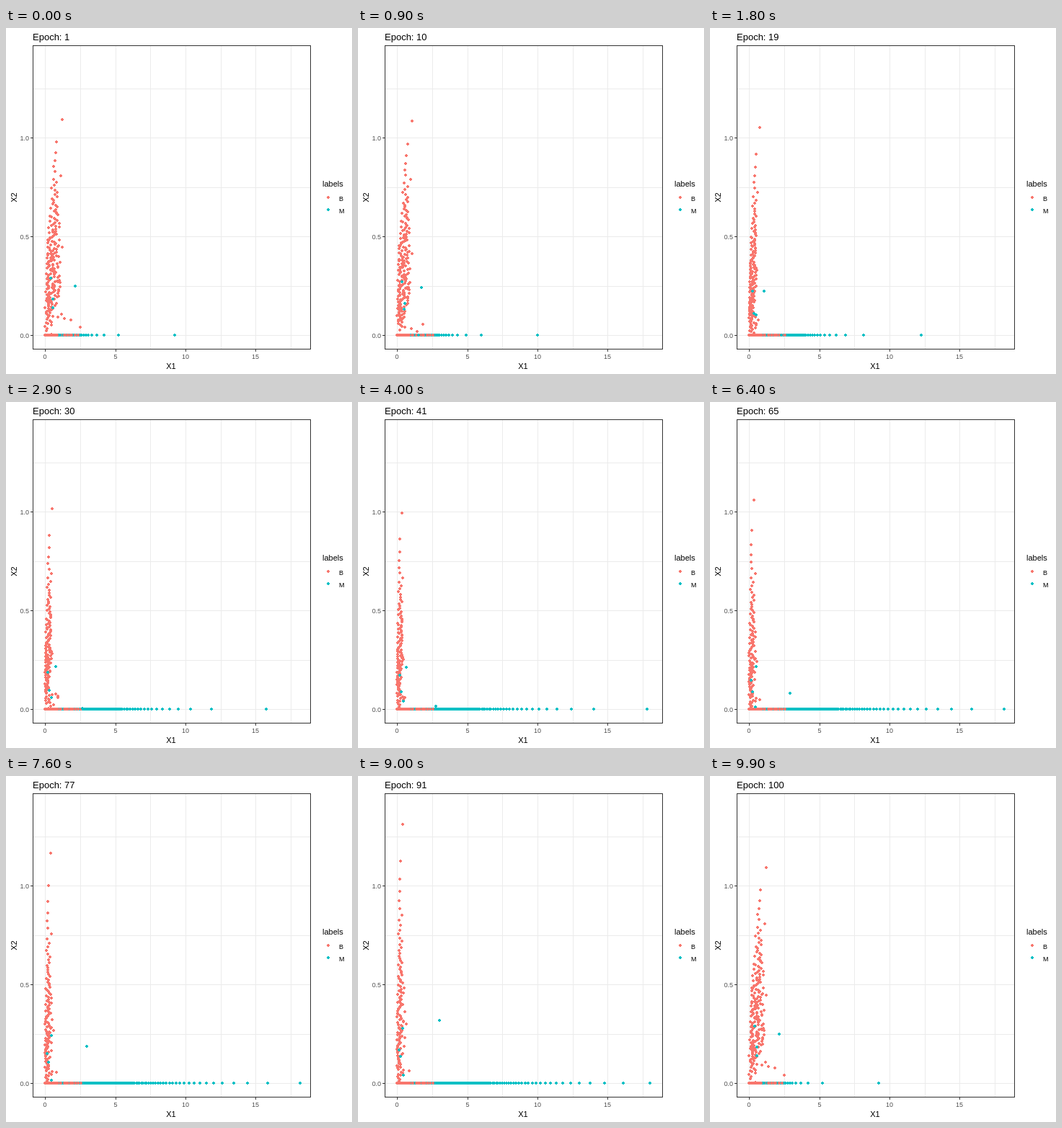
Write an HTML page with a canvas that moves like this. It is 480x480 px and loops after 10 s.

```html
<!DOCTYPE html>
<html lang="en">
<head>
<meta charset="utf-8">
<title>Epoch scatter</title>
<style>
  html, body { margin: 0; width: 100%; height: 100%; overflow: hidden; background: #fff; }
  svg, canvas { position: absolute; left: 0; top: 0; width: 480px; height: 480px; }
  text { font: 11px "Liberation Sans", Arial, sans-serif; fill: #000; }
  .tick { font-size: 9px; fill: #4d4d4d; }
  .key { font-size: 9px; }
  #title { font-size: 13px; }
</style>
</head>
<body>
<svg viewBox="0 0 480 480">
  <g id="grid" stroke="#ebebeb" shape-rendering="crispEdges"></g>
  <rect x="37.5" y="24.5" width="385" height="421" fill="none" stroke="#333" shape-rendering="crispEdges"/>
  <g id="ticks" stroke="#333" shape-rendering="crispEdges"></g>
  <g id="labels"></g>
  <text id="title" x="37" y="17">Epoch: 1</text>
  <text x="229" y="473" text-anchor="middle">X1</text>
  <text transform="translate(15 235) rotate(-90)" text-anchor="middle">X2</text>
  <text x="439" y="220">labels</text>
  <text class="key" x="462" y="240">B</text>
  <text class="key" x="462" y="257">M</text>
</svg>
<canvas id="dots" width="480" height="480"></canvas>
<script>
const RED = '#F8766D', TEAL = '#00BFC4';
const X0 = 54, Y0 = 426, STEP = 100, EPOCHS = 100;
const N_RED = 357, N_TEAL = 207;
const $ = id => document.getElementById(id);
const mix = (a, b, f) => a + (b - a) * f;

function add(parent, tag, attrs, text) {
  const el = document.createElementNS('http://www.w3.org/2000/svg', tag);
  for (const k in attrs) el.setAttribute(k, attrs[k]);
  if (text) el.textContent = text;
  $(parent).append(el);
}
const line = (parent, x1, y1, x2, y2) => add(parent, 'line', { x1, y1, x2, y2 });

for (let v = 0; v < 18; v += 2.5) {
  const x = Math.round(54.2 + 19.47 * v) + 0.5;
  line('grid', x, 25, x, 445);
  if (v % 5) continue;
  line('ticks', x, 446, x, 449);
  add('labels', 'text', { class: 'tick', x: x - 0.5, y: 459, 'text-anchor': 'middle' }, String(v));
}
for (let v = 0; v < 1.3; v += 0.25) {
  const y = Math.floor(426.5 - 273.7 * v) + 0.5;
  line('grid', 38, y, 422, y);
  if (v % 0.5 || v > 1) continue;
  line('ticks', 34, y, 37, y);
  add('labels', 'text', { class: 'tick', x: 32, y: y + 3.5, 'text-anchor': 'end' }, v.toFixed(1));
}

let seed = 4117;
function rand() {
  seed = (seed + 0x6D2B79F5) | 0;
  let t = Math.imul(seed ^ (seed >>> 15), seed | 1);
  t ^= t + Math.imul(t ^ (t >>> 7), t | 61);
  return ((t ^ (t >>> 14)) >>> 0) / 4294967296;
}

// Epoch to phase; whole phases are the poses below.
const pace = [[1, 0], [12, 0.32], [19, 1], [34, 1.86], [41, 2], [65, 3], [77, 4], [91, 5], [99, 5.57]];

// reach, tail: length of the teal row and pull on its largest values.
// from, rise, pow: height of the red cloud; bend, wide, stray: its sideways spread.
const poses = [
  { reach: 15.5, tail: 84, from: 0.5, rise: 111, pow: 0.55, bend: 0.00022, wide: 22, stray: 24 },
  { reach: 28, tail: 68, from: 0.7, rise: 91, pow: 0.65, bend: 0.00016, wide: 12, stray: 5 },
  { reach: 54, tail: 21, from: 1, rise: 89, pow: 0.65, bend: 0.00007, wide: 10, stray: 4 },
  { reach: 65, tail: -37, from: 1, rise: 87, pow: 0.7, bend: 0.00006, wide: 9, stray: 10 },
  { reach: 65, tail: -37, from: 1, rise: 96, pow: 0.7, bend: 0.00006, wide: 9, stray: 12 },
  { reach: 67, tail: -51, from: 1, rise: 108, pow: 0.7, bend: 0.00005, wide: 9, stray: 14 }
];

// Teal dots off the axis: x and height at both ends, and the dip between.
const strays = [
  { x: [96, 62], h: [68, 76], dip: 14 },
  { x: [65, 59], h: [38, 37], dip: 14 },
  { x: [62, 57], h: [79, 46], dip: 20 },
  { x: [65, 63], h: [50, 11], dip: 25 },
  { x: [75, 113], h: [0, 87], dip: 32 }
];

// Exponential quantile of each rank, largest first.
const ranks = n => Array.from({ length: n }, (_, i) => -Math.log((i + 0.5) / n));
const teal = ranks(N_TEAL);
const red = ranks(N_RED).map(t => ({ t, side: rand() ** 1.2, odd: rand() }));

function phaseAt(epoch) {
  if (epoch === EPOCHS) return 0; // the last step snaps back to the start
  const i = Math.max(1, pace.findIndex(p => p[0] >= epoch));
  const [e0, p0] = pace[i - 1], [e1, p1] = pace[i];
  return mix(p0, p1, (epoch - e0) / (e1 - e0));
}

// Blends neighbouring poses; past the last one the trend carries on.
function poseAt(phase) {
  const k = Math.min(poses.length - 2, Math.floor(phase));
  const pose = {};
  for (const key in poses[k]) pose[key] = mix(poses[k][key], poses[k + 1][key], phase - k);
  return pose;
}

const ctx = $('dots').getContext('2d');
function dot(dx, h, color) {
  const x = Math.round(X0 + Math.max(0, dx)), y = Math.round(Y0 - Math.max(0, h));
  ctx.fillStyle = color;
  ctx.fillRect(x - 2, y - 1, 4, 2);
  ctx.fillRect(x - 1, y - 2, 2, 4);
}

function drawRed(p, { t, side, odd }) {
  const h = p.rise * Math.max(0, t - p.from) ** p.pow;
  const taper = Math.max(0.15, 1 - h / 300);
  const spread = p.wide * side * Math.min(1, h / 70) + p.stray * odd ** 6 * Math.min(1, h / 15);
  const flat = (12 * side + 50 * odd ** 16) * Math.max(0, 1 - h / 30);
  dot(flat + p.bend * h * h + taper * spread, h, RED);
}

function drawStray({ x, h, dip }, phase) {
  const f = phase / (poses.length - 1);
  dot(mix(x[1], x[0], Math.exp(-phase)) - X0, mix(h[0], h[1], f) - dip * Math.sin(Math.PI * f), TEAL);
}

let shown = 0;
function draw(epoch) {
  const phase = phaseAt(epoch), pose = poseAt(phase);
  ctx.clearRect(0, 0, 480, 480);
  teal.forEach(t => dot(pose.reach * t + pose.tail * (t / 6) ** 6, 0, TEAL));
  red.forEach(r => drawRed(pose, r));
  strays.forEach(s => drawStray(s, phase));
  dot(393, 191, RED);
  dot(393, 174, TEAL);
  $('title').textContent = 'Epoch: ' + epoch;
}

function tick() {
  const epoch = Math.floor(performance.now() / STEP) % EPOCHS + 1;
  if (epoch !== shown) draw(shown = epoch);
  requestAnimationFrame(tick);
}
tick();
</script>
</body>
</html>
```
